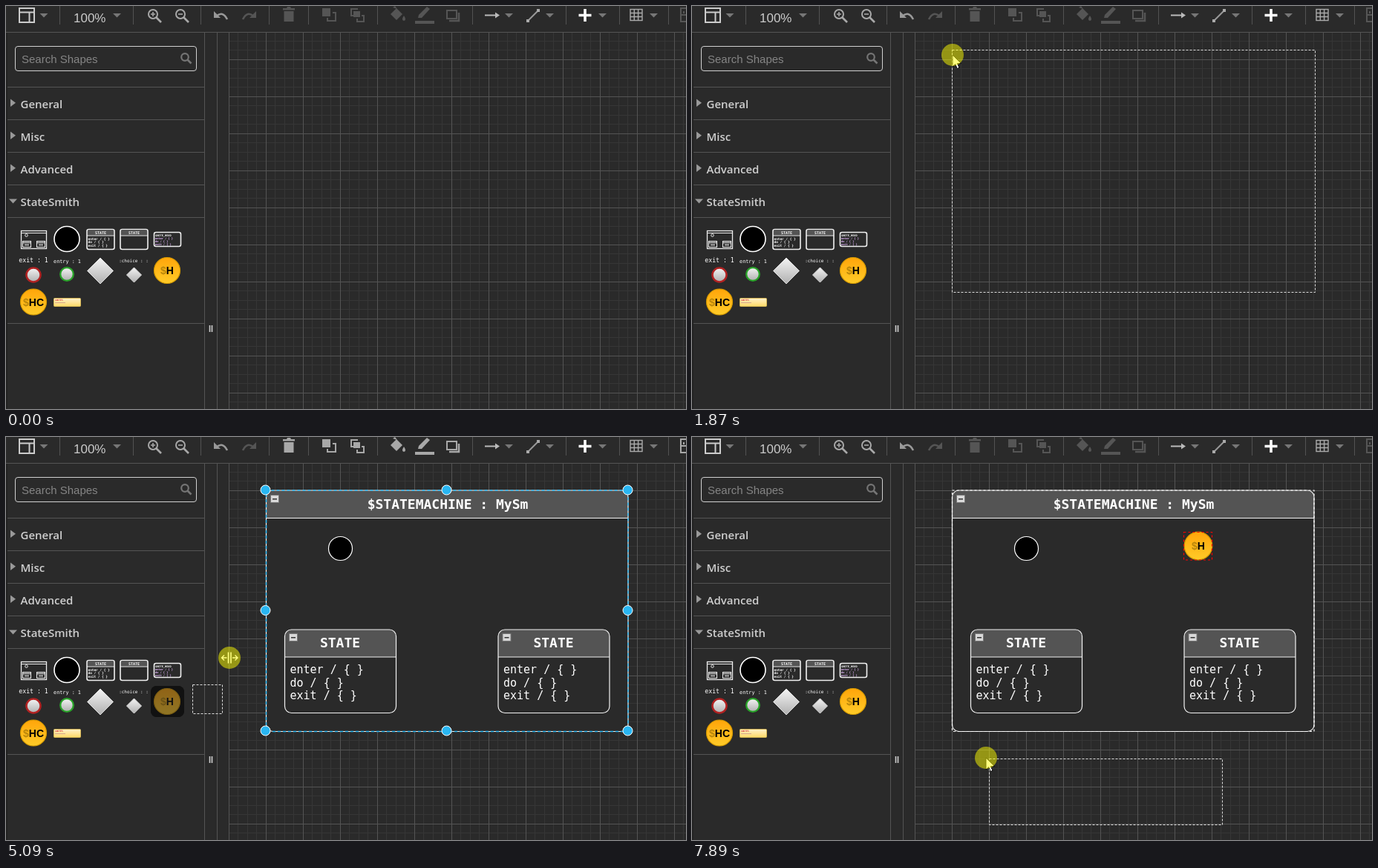
An HTML page that plays this animation: 916 by 544 pixels, repeating every 8000 ms.

```html
<!DOCTYPE html>
<html lang="en">
<head>
<meta charset="utf-8">
<title>Diagram editor</title>
<style>
html, body { margin: 0; width: 100%; height: 100%; overflow: hidden; background: #2a2a2a; }
svg { display: block; }
text { white-space: pre; }
.ui { font-family: "Open Sans", sans-serif; fill: #cfcfcf; }
.head { font-weight: 600; font-size: 15px; }
.sans { font-family: "Liberation Sans", Arial, sans-serif; }
.mono { font-family: "DejaVu Sans Mono", monospace; fill: #fff; }
.b { font-weight: 700; }
.mid { text-anchor: middle; }
</style>
</head>
<body>
<svg id="stage" width="916" height="544" viewBox="0 0 916 544"></svg>
<script>
const LOOP = 8000;

// Markup helpers
const rect = (x, y, w, h, a = '') => `<rect x="${x}" y="${y}" width="${w}" height="${h}" ${a}/>`;
const circ = (x, y, r, a = '') => `<circle cx="${x}" cy="${y}" r="${r}" ${a}/>`;
const path = (d, a = '') => `<path d="${d}" ${a}/>`;
const text = (x, y, size, s, cls, a = '') =>
  `<text x="${x}" y="${y}" font-size="${size}" class="${cls}" ${a}>${s}</text>`;
const group = (id, s, a = '') => `<g id="${id}" ${a}>${s}</g>`;
const line = (color, w = 1) => `fill="none" stroke="${color}" stroke-width="${w}"`;
const range = (n, f) => Array.from({ length: n }, (_, i) => f(i)).join('');
const diamond = (x, y, r) =>
  path(`M${x} ${y - r}l${r} ${r}l${-r} ${r}l${-r} ${-r}z`, 'fill="url(#silver)" stroke="#ddd"');

const defs = `<defs>${[
  ['silver', '#f4f4f4', '#b0b0b0'],
  ['gold', '#ffa50a', '#ffcb28'],
  ['cream', '#fff2cc', '#ffd966']
].map(([id, a, b]) => `<linearGradient id="${id}" x2="0" y2="1">
  <stop stop-color="${a}"/><stop offset="1" stop-color="${b}"/></linearGradient>`).join('')}</defs>`;

// Diagram parts
const history = (x, y, r, s) => circ(x, y, r, 'fill="url(#gold)" stroke="#d79b00" stroke-width="1.2"') +
  text(x, y + 5, 14, `<tspan fill="#b8860b">$</tspan>${s}`, 'sans b mid');

const collapse = (x, y) => rect(x + .5, y + .5, 11, 10, 'fill="#d8d8d8" stroke="#777"') +
  rect(x + 3, y + 5, 6, 1.5, 'fill="#333"');

const box = (x, y, w, h, head, r) =>
  rect(x, y, w, h, `rx="${r}" fill="#2a2a2a"`) +
  path(`M${x} ${y + head}V${y + r}q0 ${-r} ${r} ${-r}H${x + w - r}q${r} 0 ${r} ${r}V${y + head}z`, 'fill="#545454"') +
  rect(x, y, w, h, `rx="${r}" ${line('#f2f2f2', 1.2)}`) +
  path(`M${x} ${y + head}h${w}`, line('#f2f2f2', 1.2));

const state = (x, y) => box(x, y, 150, 112.5, 37, 9) + collapse(x + 5.5, y + 5) +
  text(x + 74.5, y + 24, 18, 'STATE', 'mono b mid') +
  ['enter / { }', 'do / { }', 'exit / { }'].map((s, i) => text(x + 7, y + 59 + i * 17.6, 15, s, 'mono')).join('');

const machine = (x, y) => box(x, y, 487.5, 325.5, 37.5, 9) + collapse(x + 5.5, y + 6) +
  text(x + 244.5, y + 25, 18, '$STATEMACHINE : MySm', 'mono b mid') +
  circ(x + 100, y + 78.5, 16, 'fill="#000" stroke="#fff" stroke-width="1.2"') +
  state(x + 25, y + 188) + state(x + 312.5, y + 188);

const tip = (id, x2, y1, y2, sep, lines, body) => group(id,
  rect(295.5, y1 + .5, x2 - 296, y2 - y1 - 1, 'rx="6" fill="#2a2a2a" stroke="#585858"') +
  path(`M296 ${sep + .5}H${x2 - 1}`, line('#585858')) + body +
  lines.map((s, i) => text((295 + x2) / 2, sep + 28 + i * 23, 16.5, s, 'ui mid')).join(''));

// Toolbar
const caret = (x, y = 10) => path(`M${x} ${y}h11l-5.5 5.5z`, 'fill="#777"');
const lens = (x, y, plus) => circ(x, y, 6, line('#a8a8a8', 2)) +
  path(`M${x + 4.5} ${y + 4.5}l6.5 6.5`, line('#a8a8a8', 2.6)) +
  path(`M${x - 3} ${y}h6` + (plus ? `M${x} ${y - 3}v6` : ''), line('#a8a8a8', 1.6));
const cc = (w = 2) => line('currentColor', w);
const solid = 'fill="currentColor"';

const editTools = group('edit',
  path('M373 3h5l1-2h4l1 2h5v2.5h-16zM374.500 7h13v14h-13z', solid) +
  rect(426, 3, 11, 11, solid) + path('M440 9h4v11h-11v-4', cc()) +
  path('M474 4h-9v9h4', cc()) + rect(468, 7, 9, 8, solid) + path('M479 13h3v8h-9v-4', cc()) +
  path('M518 11l8-8l8 8l-8 8zM521 2l3-2l3 4z', solid) + path('M536 13q4 6 0 7q-4-1 0-7', solid) +
  path('M555 16l1-4l11-11l4 3l-11 12z', solid) + rect(551, 20, 26, 4, solid) +
  rect(594, 6, 13, 11, cc()) + path('M597 20h13v-11', cc(2.5)) +
  path('M916 3h-7v18h7M909 12h7M913 7v3', cc()));

const toolbar = rect(0, 0, 916, 35, 'fill="#2a2a2a"') + path('M0 35.500H916', line('#545454')) +
  path([72, 171, 262, 354, 407, 500, 628, 754, 826, 892].map(x => `M${x + .5} 0v25`).join(''), line('#525252')) +
  rect(18, 3, 20, 19, line('#ccc', 2)) + path('M18 8.500h20M31.500 8v14', line('#ccc', 2)) + caret(45.5) +
  text(91, 22, 17, '100%', 'sans', 'fill="#ccc"') + caret(144) +
  lens(198, 11, true) + lens(235, 11) +
  path('M283 14q9-8 15 4', line('#999', 2.6)) + path('M280 7v9h9z', 'fill="#999"') +
  path('M334 14q-9-8-15 4', line('#555', 2.6)) + path('M337 7v9h-9z', 'fill="#555"') +
  path('M645 12.500h15', line('#bbb', 2)) + path('M659 8.500l6 4l-6 4z', 'fill="#bbb"') + caret(672) +
  path('M703 20L717 6', line('#999', 2)) + rect(701, 18, 4, 4, 'fill="#aaa"') + rect(715, 4, 4, 4, 'fill="#aaa"') + caret(727) +
  path('M771.500 12.500h17M780 4v17', line('#fff', 3.6)) + caret(798) +
  rect(841, 4.5, 16, 15, line('#aaa', 1.4)) + path('M841 9.500h16M841 14.500h16M846.300 4v16M851.600 4v16', line('#aaa', 1.4)) + caret(867) +
  editTools;

// Sidebar
const rowY = i => 109.5 + i * 44;
const sidebar = rect(0, 36, 2, 508, 'fill="#222"') +
  rect(12.5, 54.5, 244, 33, `rx="3.500" ${line('#d0d0d0')}`) +
  text(21, 77, 15, 'Search Shapes', 'sans', 'fill="#858585"') +
  circ(241, 69, 4.8, line('#757575', 2.2)) + path('M244.500 72.500l5 5', line('#757575', 2.6)) +
  path(range(5, i => `M2 ${rowY(i)}H267`) + 'M2 428.500H267', line('#545454')) +
  ['General', 'Misc', 'Advanced', 'StateSmith'].map((s, i) => text(19.5, rowY(i) + 28, 15, s, 'ui head') +
    path(i < 3 ? `M6 ${rowY(i) + 16}v10.500l7-5.250z` : 'M4 260.500h11l-5.500 6z', 'fill="#999"')).join('');

const tiny = (x, y, w, h, head) => rect(x, y, w, h, `rx="2.500" ${line('#f0f0f0', 1.6)}`) +
  (head ? rect(x + 1, y + 1, w - 2, 7, 'fill="#545454"') + path(`M${x} ${y + 8.5}h${w}`, line('#eee')) +
    text(x + w / 2, y + 6.5, 5, 'STATE', 'mono b mid') : '');

const icons =
  rect(20.5, 303.5, 34, 24, line('#eee', 1.3)) + path('M20 306.500h35', line('#eee')) + circ(27.5, 309.5, 1.8, line('#eee')) +
  rect(22.5, 317.5, 11, 8, line('#eee')) + rect(41.5, 317.5, 11, 8, line('#eee')) +
  path('M23 319.500h10M42 319.500h10M25 322.500h6M44 322.500h6', line('#ccc', 1.5)) +
  circ(82, 314.5, 17, 'fill="#000" stroke="#fff" stroke-width="1.600"') +
  tiny(109, 301.5, 37, 27, true) +
  ['enter / { }', 'do / { }', 'exit / { }'].map((s, i) => text(110.5, 315.5 + i * 4.7, 4.4, s, 'mono b')).join('') +
  tiny(154, 301.5, 37, 27, true) +
  tiny(199.5, 305.5, 36, 19) +
  ['$NOTE_HEAD', 'enter / { }', 'do / { }', 'exit / { }'].map((s, i) =>
    text(201, 310.5 + i * 4, 3.6, s, 'mono b', `style="fill:${i ? '#e6b8ff' : '#fff'}"`)).join('') +
  text(37, 346, 8.2, 'exit : 1', 'mono mid') + circ(37, 363, 9.5, 'fill="url(#silver)" stroke="#b22222" stroke-width="2.500"') +
  text(82.5, 347, 6.8, 'entry : 1', 'mono mid') + circ(82, 362, 8.8, 'fill="url(#silver)" stroke="#28a428" stroke-width="2.300"') +
  diamond(127, 357.5, 17.5) +
  text(172, 346, 6, ':choice : :', 'mono mid') + diamond(172.5, 363, 10) +
  history(217, 357, 17.5, 'H') + history(37, 399.5, 17.5, 'HC') +
  rect(64.5, 394.5, 36, 11, 'rx="1" fill="url(#cream)" stroke="#d6b656"') +
  text(66, 398, 3, '$NOTES', 'mono', 'style="fill:#c00"') + path('M66 400.500h14', line('#c98', .8));

// Canvas
const gridPath = step => {
  let d = '';
  for (let x = 300; x < 916; x += step) d += `M${Math.floor(x) + .5} 36V544`;
  for (let y = step > 20 ? 72 : 47; y < 544; y += step) d += `M300 ${Math.floor(y) + .5}H916`;
  return d;
};
const splitter = group('split', rect(268, 36, 16, 508, 'fill="#000"')) +
  path('M267.500 36V544M284.500 36V544', line('#545454')) +
  path('M274.500 431v9M277.500 431v9', line('#d0d0d0', 1.6));

const xs = [350, 472.5, 594, 716, 838], ys = [72, 153, 234.5, 316, 397];
const edge = xs.flatMap((x, i) => ys.filter((_, j) => i % 4 === 0 || j % 4 === 0).map(y => [x, y]));
const corners = [349.5, 593.5, 837.5].flatMap(x => [71.5, 234, 396.5].map(y => [x, y]))
  .filter(([x, y]) => x !== 593.5 || y !== 234);
const outline = a => rect(350.5, 72, 487.5, 325.5, a);
const bigArrow = (x, y, turn) => path('M-16 0l12-11v6h20v10h-20v6z',
  `fill="#29424e" stroke="#2f5364" transform="translate(${x} ${y}) rotate(${turn})"`);

const canvas = path(gridPath(12.5), line('#363636')) + path(gridPath(50), line('#545454')) +
  group('machine', machine(350.5, 72)) +
  group('hist', history(682, 147, 18.8, 'H') + rect(662.5, 128.5, 38, 37.5, line('#f00', 1.2) + ' stroke-dasharray="3 3"')) +
  group('frame', outline(line('#fff', 1.2) + ' stroke-dasharray="3 3"')) +
  group('hints', bigArrow(314, 234.5, 0) + bigArrow(872, 234.5, 180) + bigArrow(593.5, 36, 90) + bigArrow(593.5, 432, -90) +
    edge.map(([x, y]) => path(`M${x - 2.5} ${y - 2.5}l5 5m0-5l-5 5`, line('#29b6f2', 1.4))).join('')) +
  group('handles', outline(line('#29b6f2', 1.5) + ' stroke-dasharray="4 3"') +
    corners.map(([x, y]) => circ(x, y, 6.5, 'fill="#29b6f2" stroke="#fff"')).join(''));

const tips = tip('tipMachine', 831, 129, 543, 501, ['State Machine'], machine(318.5, 150.5)) +
  tip('tipChoice', 447, 294, 503, 439, ['Choice Point', 'No Label'], diamond(369, 364, 49)) +
  tip('tipH', 386, 315, 441, 400, ['History'], history(338, 355.5, 19, 'H')) +
  tip('tipHC', 386, 358, 507, 443, ['History', 'Continue'], history(338, 398.5, 19, 'HC')) +
  tip('tipNotes', 661, 333, 508, 467, ['Notes'],
    rect(318.5, 353.5, 314, 89, 'fill="url(#cream)" stroke="#d6b656"') + text(325, 371, 14, '$NOTES', 'mono', 'style="fill:#c00"'));

const pointer = group('pointer',
  group('arrow', path('M0 0v16l3.700-3.400l2.600 5.900l2.700-1.200l-2.600-5.700h5.200z', 'fill="#fff" stroke="#000" stroke-width=".9"')) +
  group('resize', path('M-1.500-7.500v15M2-7.500v15', line('#fff', 1.6)) +
    path('M-3.500 0h-6.500m3-3.500l-3.500 3.500l3.500 3.500M4 0h6.500m-3-3.500l3.500 3.500l-3.500 3.500', line('#fff', 1.4))) +
  group('glow', circ(0, 0, 15, 'fill="#ff0" fill-opacity=".5"')));

document.getElementById('stage').innerHTML = defs + rect(0, 0, 916, 544, 'fill="#2a2a2a"') +
  group('rowHover', rect(2, 0, 265, 43, 'fill="#0a0a0a"')) +
  group('cellHover', rect(0, 0, 45, 42, 'rx="8" fill="#000"')) +
  sidebar + icons + group('dim', rect(0, 0, 45, 42, 'rx="8" fill="#222" fill-opacity=".5"')) +
  canvas + splitter + toolbar + tips +
  '<rect id="ghost" fill="none" stroke="#ddd" stroke-dasharray="3 2"/>' + pointer;

const el = {};
document.querySelectorAll('[id]').forEach(e => el[e.id] = e);

// Pointer moves: start, end, steps, waypoints [share, x, y], drag { size, drop time, pressed cell }
const moves = [
  { a: 180, b: 930, n: 12, pts: [[0, 350, 530], [.25, 235, 450], [.6, 62, 335], [1, 38, 316]] },
  { a: 1060, b: 1810, n: 12, pts: [[0, 38, 316], [1 / 11, 80, 285], [3 / 11, 194, 197.6], [4 / 11, 222, 166], [5 / 11, 276, 126], [.8, 342, 72], [1, 351, 65.5]],
    drag: { w: 489, h: 327, drop: 2140, cell: [0, 0] } },
  { a: 3150, b: 3780, n: 10, pts: [[0, 348, 67], [1 / 3, 276, 170], [8 / 9, 120, 366], [1, 113, 370]] },
  { a: 3980, b: 4750, n: 11, pts: [[0, 115, 369], [.3, 140, 363], [.6, 195, 358], [1, 217, 357]] },
  { a: 4950, b: 5710, n: 12, pts: [[0, 217, 357], [1 / 11, 251, 334.5], [2 / 11, 301, 298], [.5, 520, 195], [1, 664, 130]],
    drag: { w: 40, h: 39, drop: 5840, cell: [4, 1] } },
  { a: 5840, b: 6610, n: 11, pts: [[0, 664, 130], [.2, 560, 185], [.6, 277, 312], [.9, 30, 408], [1, 18, 412]] },
  { a: 6670, b: 6671, n: 2, pts: [[0, 17, 413], [1, 17, 413]] },
  { a: 6810, b: 6990, n: 4, pts: [[0, 24, 412], [1 / 3, 58, 405], [1, 82, 401]] },
  { a: 7190, b: 7890, n: 11, pts: [[0, 82, 401], [.2, 130, 400], [.6, 290, 417], [.9, 394, 432], [1, 396, 433]],
    drag: { w: 314, h: 89, drop: LOOP, cell: [1, 2] } }
];

// Visible spans in ms
const spans = {
  pointer: [180, LOOP], machine: [2210, LOOP], handles: [2680, 5300], hist: [5840, LOOP],
  frame: [5900, LOOP], hints: [5900, 7260],
  tipMachine: [870, 1060], tipChoice: [3980, 4390], tipH: [4530, 4950], tipHC: [6810, 6930], tipNotes: [6985, 7190]
};

const show = (id, on) => { el[id].style.display = on ? '' : 'none'; };
const move = (id, x, y) => el[id].setAttribute('transform', `translate(${x} ${y})`);
const snap = (v, o) => o + 12.5 * Math.round((v - o) / 12.5);

function at(pts, u) {
  const i = Math.max(1, pts.findIndex(p => p[0] >= u - 1e-6));
  const [u0, x0, y0] = pts[i - 1], [u1, x1, y1] = pts[i];
  const f = (u - u0) / (u1 - u0);
  return [x0 + (x1 - x0) * f, y0 + (y1 - y0) * f];
}

function render(t) {
  for (const id in spans) show(id, t >= spans[id][0] && t < spans[id][1]);
  el.edit.style.color = t >= 2680 && t < 5900 ? '#a8a8a8' : '#555';

  const m = moves.filter(v => v.a <= t).pop() || moves[0];
  const k = Math.max(0, Math.min(m.n - 1, Math.floor((t - m.a) / (m.b - m.a) * (m.n - 1) + .2)));
  const [x, y] = at(m.pts, k / (m.n - 1));
  // Page reactions trail the pointer by one step
  const late = t > m.b + 30 ? k : Math.max(0, k - 1);
  const [lx, ly] = at(m.pts, late / (m.n - 1));

  move('pointer', Math.round(x), Math.round(y));
  const sizing = x > 268 && x < 306 && y > 36;
  show('resize', sizing);
  show('arrow', !sizing);

  const d = m.drag, held = !!d && t < d.drop;
  show('glow', held);
  show('ghost', held && k > 0);
  if (held) {
    const inside = lx >= 300;
    el.ghost.setAttribute('x', Math.floor(inside ? snap(lx, 300) : lx) + .5);
    el.ghost.setAttribute('y', Math.floor(inside ? snap(ly, 72) : ly) + .5);
    el.ghost.setAttribute('width', d.w);
    el.ghost.setAttribute('height', d.h);
  }

  const seen = t >= 180;
  const row = Math.floor((ly - 109.5) / 44);
  show('rowHover', seen && lx < 267 && row >= 0 && row < 4);
  move('rowHover', 0, 110 + row * 44);

  const pressed = held && t < m.a + 200;
  const col = pressed ? d.cell[0] : Math.floor((lx - 15) / 45);
  const line = pressed ? d.cell[1] : Math.floor((ly - 294) / 42);
  const valid = col >= 0 && line >= 0 && line < 3 && col < (line < 2 ? 5 : 2);
  show('cellHover', seen && valid);
  show('dim', pressed);
  move('cellHover', 15 + col * 45, 294 + line * 42);
  move('dim', 15 + col * 45, 294 + line * 42);
  show('split', seen && lx >= 268 && lx < 285 && ly > 36);
}

let start;
function tick(now) {
  start ??= now;
  render((now - start) % LOOP);
  requestAnimationFrame(tick);
}
render(0);
requestAnimationFrame(tick);
</script>
</body>
</html>
```
